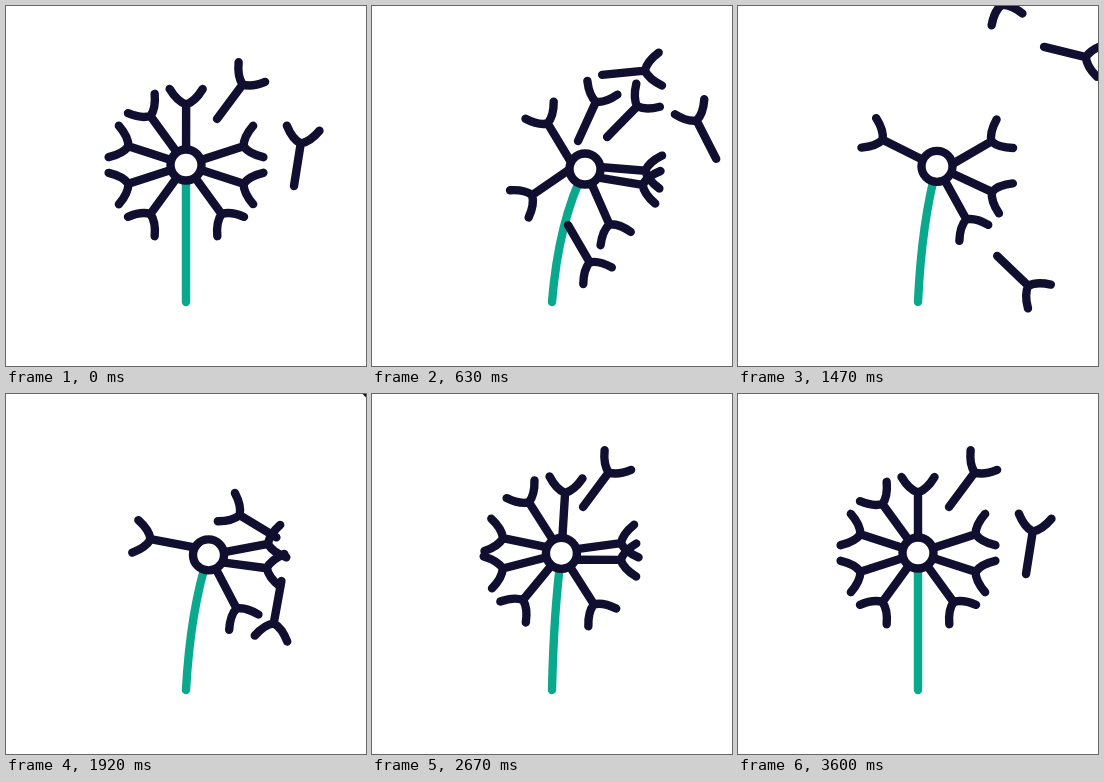
An HTML page with a canvas that plays this animation: 360x360 px, repeating every 4500 ms.

```html
<!DOCTYPE html>
<html lang="en">
<head>
<meta charset="utf-8">
<title>Dandelion in the wind</title>
<style>
  html, body { margin: 0; width: 100%; height: 100%; overflow: hidden; background: #fff; }
  canvas { display: block; }
</style>
</head>
<body>
<canvas width="360" height="360"></canvas>
<script>
const ctx = document.querySelector('canvas').getContext('2d');
const { sin, cos, min, max, PI } = Math;
const LOOP = 4500, CALM = 3600, GLIDE = 600;
const DARK = '#110f2f', GREEN = '#0aa88c';
const RAD = PI / 180;

// Smooth curve without overshoot through [time, value] points, straight beyond the last one.
function curve(points, t) {
  const last = points.length - 1;
  const slope = k => (points[k + 1][1] - points[k][1]) / (points[k + 1][0] - points[k][0]);
  const tangent = k => {
    if (k === 0) return slope(0);
    if (k === last) return slope(last - 1);
    const a = slope(k - 1), b = slope(k);
    return a * b > 0 ? 2 * a * b / (a + b) : 0;
  };
  const [endTime, endValue] = points[last];
  if (t >= endTime) return endValue + tangent(last) * (t - endTime);
  const i = max(0, points.findIndex(p => p[0] > t) - 1);
  const [t0, v0] = points[i], [t1, v1] = points[i + 1];
  const span = t1 - t0, u = (t - t0) / span, w = 1 - u;
  return w * w * (1 + 2 * u) * v0 + u * u * (3 - 2 * u) * v1
    + span * u * w * (w * tangent(i) - u * tangent(i + 1));
}

// The head leans with the wind; gust and sigh make the held seeds swing on it.
const sway = [[-1, 0], [0, 0], [630, 33], [990, 24], [1470, 19], [2370, 26], [2970, -7], [CALM, 0], [LOOP, 0]];
const lean = t => curve(sway, t);
const strength = t => 20 * sin(PI * t / CALM);
const gust = t => strength(t) * cos(2 * PI * (t - 630) / 1740);
const sigh = t => 34 * sin(2 * PI * min(t, 3000) / 3000) * (1 - t / 4800);

// out: points [time, x, y] of the flight away; from: offset [x, y, angle] the seed glides home from.
const seeds = [
  { rest: 72, flutter: gust },
  { rest: 108, flutter: t => -strength(t) - gust(t) },
  { rest: 144 },
  { rest: 288, flutter: sigh },
  { rest: 252, flutter: t => -sigh(t), launch: 775, spin: -0.145, home: 2340, from: [250, -60, 120],
    out: [[990, 197, 190], [1470, 259, 250], [1750, 390, 230]] },
  { rest: 216, launch: 275, spin: -0.2, home: 2340, from: [250, 40, -100],
    out: [[630, 196, 219], [990, 260, 306], [1400, 400, 320]] },
  { rest: 324, launch: 285, spin: 0.16, home: 2600, from: [200, -270, 680],
    out: [[630, 206, 135], [990, 212, 67], [1470, 248, -41]] },
  { rest: 0, launch: 0, spin: 0.0705, home: 2600, from: [0, -240, 40],
    out: [[630, 235, 131], [990, 262, 101], [1470, 306, 41]] },
  { rest: 36.6, perch: [211, 113], launch: 380, spin: 0.19, home: 2600, from: [160, 130, 20],
    out: [[630, 230, 69], [990, 303, 16]] },
  { rest: 9, perch: [288, 180], launch: 425, spin: -0.175, home: 3300, from: [220, -40, -200], bounce: 3.56,
    out: [[630, 344, 153], [990, 400, 72]] },
  { rest: 160, perch: [420, -20], launch: 2700, spin: -0.1,
    out: [[2970, 312, 15], [3240, 420, 50]] }
];

function headAt(t) {
  const d = lean(t);
  return [180 + d, 159 + d * d / 270];
}

function restPose({ rest, perch }, t) {
  if (perch) return [...perch, rest];
  const [x, y] = headAt(t), angle = rest + 0.37 * lean(t);
  return [x + 17.5 * sin(angle * RAD), y - 17.5 * cos(angle * RAD), angle];
}

function heldPose(seed, t) {
  const [x, y, angle] = restPose(seed, t);
  return [x, y, angle + (seed.flutter ? seed.flutter(t) : 0)];
}

function poseAt(seed, t) {
  const { launch = Infinity, home = Infinity, spin, out, from, bounce = 0 } = seed;
  if (t < launch) return heldPose(seed, t);
  if (t > home - GLIDE) {
    const u = min(1, (t - home + GLIDE) / GLIDE);
    const away = (1 - u) ** 3 * (1 - bounce * u);
    return restPose(seed, t).map((v, n) => v + away * from[n]);
  }
  const [x, y, angle] = heldPose(seed, launch);
  const path = [[launch, x, y], ...out];
  const along = axis => curve(path.map(p => [p[0], p[axis]]), t);
  return [along(1), along(2), angle + spin * (t - launch)];
}

const seedShape = new Path2D('M0 0V-43M-16.5 -58.5Q-9 -46 0 -43Q9 -46 16.5 -58.5');

function drawSeed([x, y, angle]) {
  ctx.save();
  ctx.translate(x, y);
  ctx.rotate(angle * RAD);
  ctx.stroke(seedShape);
  ctx.restore();
}

function draw(now) {
  const t = min(now % LOOP, CALM);
  const head = headAt(t);

  ctx.fillStyle = '#fff';
  ctx.fillRect(0, 0, 360, 360);
  ctx.lineWidth = 8.4;
  ctx.lineCap = ctx.lineJoin = 'round';

  ctx.strokeStyle = GREEN;
  ctx.beginPath();
  ctx.moveTo(180, 296);
  ctx.quadraticCurveTo(180 + 0.2 * lean(t), 215, ...head);
  ctx.stroke();

  ctx.strokeStyle = DARK;
  for (const seed of seeds) drawSeed(poseAt(seed, t));

  ctx.beginPath();
  ctx.arc(...head, 15.5, 0, 2 * PI);
  ctx.fill();
  ctx.stroke();
  requestAnimationFrame(() => draw(performance.now() - start));
}

const start = performance.now();
draw(0);
</script>
</body>
</html>
```
